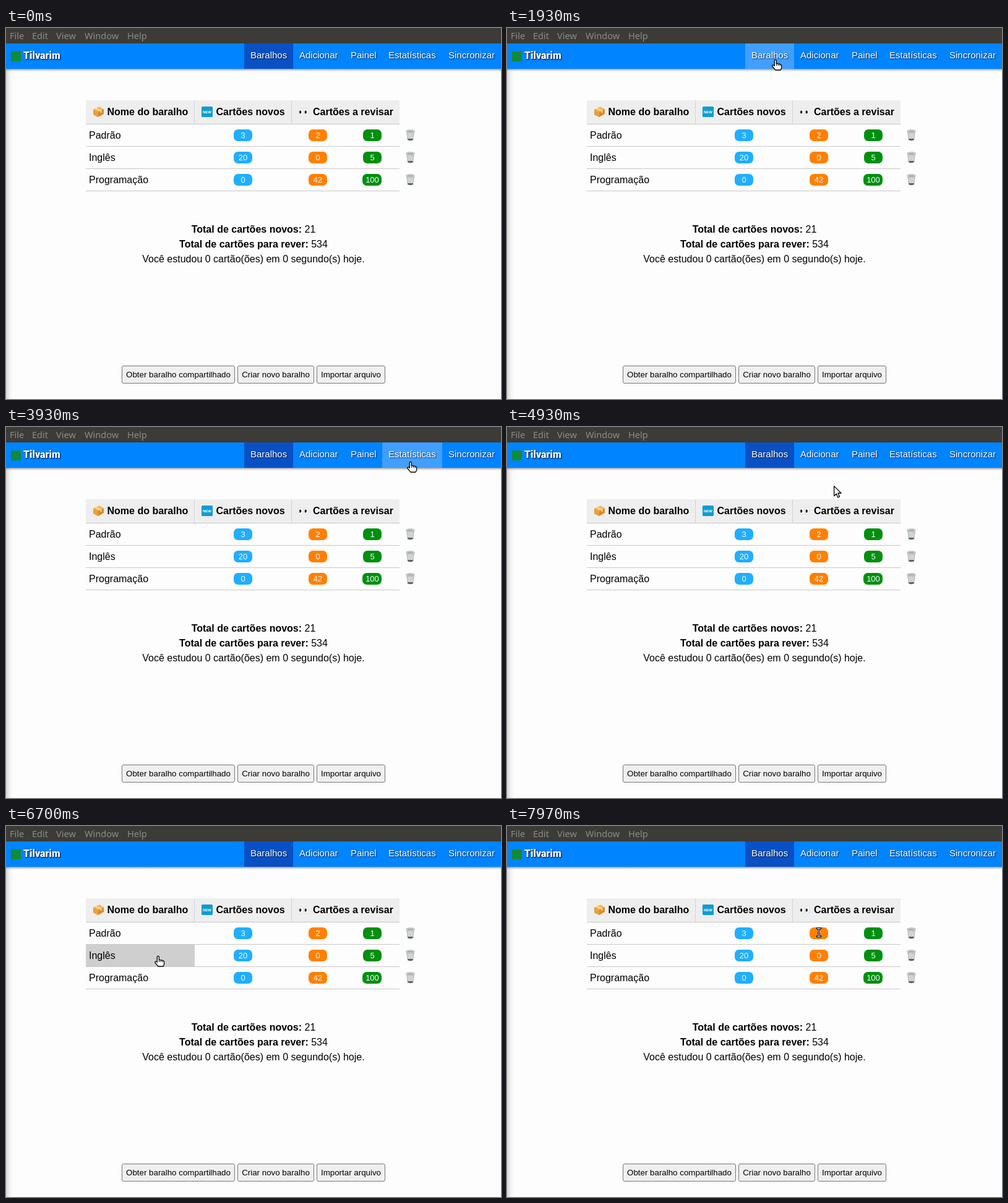
Recreate the animation shown at these times as an HTML page. Size 800 px wide and 600 px high, loop 8 s.

```html
<!DOCTYPE html>
<html lang="pt">
<head>
<meta charset="utf-8">
<title>Baralhos</title>
<style>
  html, body { margin: 0; width: 100%; height: 100%; overflow: hidden; background: #fdfdfd; }
  svg { display: block; width: 800px; height: 600px; font: 16px "Liberation Sans", Arial, sans-serif; }
  text { white-space: pre; }
  .menu { font: 14.6px "Noto Sans", "Open Sans", sans-serif; fill: #8c8b86; }
  .brand { font: 900 16px Roboto, Inter, sans-serif; fill: #fff; text-shadow: 1px 1px 2px #002; }
  .nav { font-size: 15px; fill: #fff; text-shadow: 1px 1px 2px rgba(0, 0, 0, .75); }
  .badge { font-size: 13px; fill: #f6f8fa; text-anchor: middle; }
  .bold { font-weight: bold; }
  .mid { text-anchor: middle; }
  .btn { font-size: 13.333px; }
</style>
</head>
<body>
<svg id="stage" viewBox="0 0 800 600">
  <defs>
    <linearGradient id="side">
      <stop offset="0" stop-color="#d4d4d6"/>
      <stop offset=".4" stop-color="#f0f0f1"/>
      <stop offset="1" stop-color="#fdfdfd" stop-opacity="0"/>
    </linearGradient>
    <linearGradient id="drop" x2="0" y2="1">
      <stop offset="0" stop-color="#404448" stop-opacity=".8"/>
      <stop offset=".45" stop-color="#8a8c90" stop-opacity=".35"/>
      <stop offset="1" stop-color="#fdfdfd" stop-opacity="0"/>
    </linearGradient>
    <g id="bin">
      <path d="M1.500 3 L13.500 3 L11.800 17 Q7.500 19 3.200 17Z" fill="#c4c8ca" stroke="#a2a7a9" stroke-width=".7"/>
      <path d="M3 6 L12 15 M5.500 5 L12.500 11.500 M2.800 10 L9 17 M12 6 L3.300 14.500 M9 5 L2.800 11 M12.200 10 L6 17"
        stroke="#e6e9ea" stroke-width=".8"/>
      <path d="M3.200 15 L11.800 15 L11.600 17 Q7.500 18.800 3.400 17Z" fill="#5c6062"/>
      <ellipse cx="7.500" cy="3" rx="7" ry="2.300" fill="#dde0e1" stroke="#a2a7a9" stroke-width=".8"/>
      <ellipse cx="7.500" cy="3.200" rx="4.800" ry="1.100" fill="#a4a9ab"/>
    </g>
    <g id="eye">
      <ellipse rx="3.700" ry="5.800" fill="#fff" stroke="#cfcfd0" stroke-width=".7"/>
      <ellipse cx="-1" cy=".5" rx="1.700" ry="2.700" fill="#26241c"/>
    </g>
  </defs>
  <g id="page"></g>
  <g id="arrow" stroke="#000" fill="#fff" stroke-width="1.300" stroke-linejoin="round">
    <path d="M.6 .6 V16.500 L4.300 13 L6.800 18.900 L9.500 17.700 L7 12 H12Z"/>
  </g>
  <g id="hand" stroke="#000" fill="#fff" stroke-width="1.300" stroke-linejoin="round">
    <path d="M-1.700 9.500 V.8 Q-1.700 -.7 -.2 -.7 Q1.300 -.7 1.300 .8 V6 Q2.700 4.700 4.200 6.300 Q6 5.300 7 7 Q9.600 6.500 9.600 9 V12 Q9.600 14 8 16 H-.2 Q-2.300 13 -4.700 10.500 Q-6 8.700 -4.300 8 Q-3 7.600 -1.700 9.500Z"/>
    <path d="M1.500 6.500 V9 M4.300 6.700 V9 M7 7.300 V9.500" fill="none" stroke-width="1"/>
  </g>
  <g id="beam" fill="none" stroke-linecap="square">
    <path d="M-2.500 -6.500 H2.500 M0 -6.500 V6.500 M-2.500 6.500 H2.500" stroke="#000" stroke-width="3.200"/>
    <path d="M-2.500 -6.500 H2.500 M0 -6.500 V6.500 M-2.500 6.500 H2.500" stroke="#fff" stroke-width="1"/>
  </g>
</svg>
<script>
const LOOP = 8000, LAG = 60, ENTER = 300;
const byId = id => document.getElementById(id);

const rect = (x, y, w, h, fill, more = '') =>
  `<rect x="${x}" y="${y}" width="${w}" height="${h}" fill="${fill}" ${more}/>`;
const text = (x, y, str, cls = '') => `<text x="${x}" y="${y}" class="${cls}">${str}</text>`;

const NAV = [['Baralhos', 385, 464], ['Adicionar', 464, 547], ['Painel', 547, 608],
  ['Estatísticas', 608, 705], ['Sincronizar', 705, 800]];
const DECKS = [['Padrão', 3, 2, 1], ['Inglês', 20, 0, 5], ['Programação', 0, 42, 100]];
const MENU = [['File', 6], ['Edit', 42], ['View', 81], ['Window', 127], ['Help', 196]];
const BUTTONS = [['Obter baralho compartilhado', 187, 183], ['Criar novo baralho', 374, 124],
  ['Importar arquivo', 502, 111]];
const BADGES = [[383, '#20aeff'], [504, '#ff8000'], [592, '#009010']];

const navCells = NAV.map(([, x, end]) => ({ x, y: 25, w: end - x, h: 41, on: '#409fff' }));
const deckCells = DECKS.map((_, i) => ({ x: 129, y: 156 + 36 * i, w: 176, h: 36, on: '#cfcfcf' }));
const cells = [...navCells, ...deckCells];

function topBar() {
  return rect(0, 0, 800, 25, '#3c3b37')
    + MENU.map(([s, x]) => text(x, 18, s, 'menu')).join('')
    + rect(0, 66, 14, 534, 'url(#side)')
    + rect(0, 65, 800, 7, 'url(#drop)')
    + rect(0, 25, 800, 41, '#0084ff')
    + rect(385, 25, 79, 41, '#0850c4')
    + rect(8, 38, 16, 16, '#118a3c')
    + text(28, 50, 'Tilvarim', 'brand');
}

function table() {
  const line = y => rect(129, y, 507, 1, '#c8c8cc');
  let out = rect(129, 117, 507, 38, '#eeeeee')
    + rect(304, 117, 1, 38, '#d4d4d6') + rect(461, 117, 1, 38, '#d4d4d6')
    + line(155)
    + text(163.5, 141, 'Nome do baralho', 'bold')
    + text(339.5, 141, 'Cartões novos', 'bold')
    + text(496, 141, 'Cartões a revisar', 'bold')
    + '<path d="M141 132 L151 127.500 L158 131.500 V139 L149 144 L141 140Z" fill="#d98a2b"/>'
    + '<path d="M141 132 L151 127.500 L158 131.500 L149 136Z" fill="#f5b957"/>'
    + '<path d="M149 136 V144 L141 140 V132Z" fill="#e9a03c"/>'
    + '<path d="M145 130.200 L153.500 134 V137" fill="none" stroke="#fbe3a6" stroke-width="1.800"/>'
    + rect(316, 127, 18, 17, '#109cd0', 'rx="1.500"')
    + '<text x="325" y="138" font-size="6" font-weight="bold" fill="#fff" text-anchor="middle">NEW</text>'
    + '<use href="#eye" x="476.700" y="135.500"/><use href="#eye" x="485.300" y="135.500"/>';
  DECKS.forEach(([name, ...counts], i) => {
    const y = 156 + 36 * i;
    out += text(134, y + 23, name) + line(y + 35) + `<use href="#bin" x="646" y="${y + 8}"/>`;
    counts.forEach((n, k) => {
      const [x, fill] = BADGES[k], w = n > 99 ? 31 : 30;
      out += rect(Math.floor(x - w / 2), y + 8, w, 19, fill, 'rx="7"') + text(x, y + 22, n, 'badge');
    });
  });
  return out;
}

function footer() {
  const bold = s => `<tspan class="bold">${s}</tspan>`;
  return text(400, 331, bold('Total de cartões novos:') + ' 21', 'mid')
    + text(400, 355, bold('Total de cartões para rever:') + ' 534', 'mid')
    + text(400, 379, 'Você estudou 0 cartão(ões) em 0 segundo(s) hoje.', 'mid')
    + BUTTONS.map(([s, x, w]) =>
      rect(x + .5, 546.5, w - 1, 28, '#efefef', 'rx="2.500" stroke="#767676"')
      + text(x + w / 2, 565, s, 'mid btn')).join('');
}

byId('page').innerHTML = topBar()
  + cells.map(c => rect(c.x, c.y, c.w, c.h, c.on, 'class="hover"')).join('')
  + NAV.map(([s, x]) => text(x + 10, 49, s, 'nav')).join('')
  + table() + footer();

// Pointer path: time, x, y
const PATH = [[300, 0, 300], [800, 300, 120], [1000, 387, 60], [1100, 390, 55], [1300, 420, 48],
  [1700, 440, 54], [2300, 425, 50], [2600, 452, 52], [2690, 500, 50], [2770, 548, 48],
  [3000, 582, 52], [3130, 578, 56], [3430, 578, 56], [3930, 654, 57], [4230, 738, 52],
  [4470, 750, 56], [4630, 750, 56], [5200, 330, 130], [5430, 215, 172], [5700, 190, 178],
  [5970, 207, 193], [6270, 230, 208], [6800, 250, 212], [7130, 280, 216], [7270, 316, 220],
  [7600, 420, 235], [7940, 504, 172], [8000, 504, 172]];

function pointAt(t) {
  const i = Math.max(1, PATH.findIndex(p => p[0] >= t));
  const [a, x0, y0] = PATH[i - 1], [b, x1, y1] = PATH[i];
  const k = Math.max(0, (t - a) / (b - a));
  return [x0 + (x1 - x0) * k, y0 + (y1 - y0) * k];
}

const cellAt = ([x, y]) =>
  cells.findIndex(c => x >= c.x && x < c.x + c.w && y >= c.y && y < c.y + c.h);

const overBadge = ([x, y]) => y > 156 && y < 264 && (y - 156) % 36 > 8 && (y - 156) % 36 < 27
  && BADGES.some(([bx]) => Math.abs(x - bx) < 15);

const hovers = document.querySelectorAll('.hover');
const shapes = ['arrow', 'hand', 'beam'].map(byId);

function draw(t) {
  const p = pointAt(t), under = cellAt(p);
  // The highlight trails the pointer slightly.
  const lit = t < ENTER + LAG ? -1 : cellAt(pointAt(t - LAG));
  hovers.forEach((el, i) => el.setAttribute('visibility', i === lit ? 'visible' : 'hidden'));
  const kind = overBadge(p) ? 'beam' : under >= 0 && under === lit ? 'hand' : 'arrow';
  shapes.forEach(el => {
    el.setAttribute('visibility', t >= ENTER && el.id === kind ? 'visible' : 'hidden');
    el.setAttribute('transform', `translate(${p.map(Math.round)})`);
  });
}

const start = performance.now();
function tick() {
  draw((performance.now() - start) % LOOP);
  requestAnimationFrame(tick);
}
tick();
</script>
</body>
</html>
```
